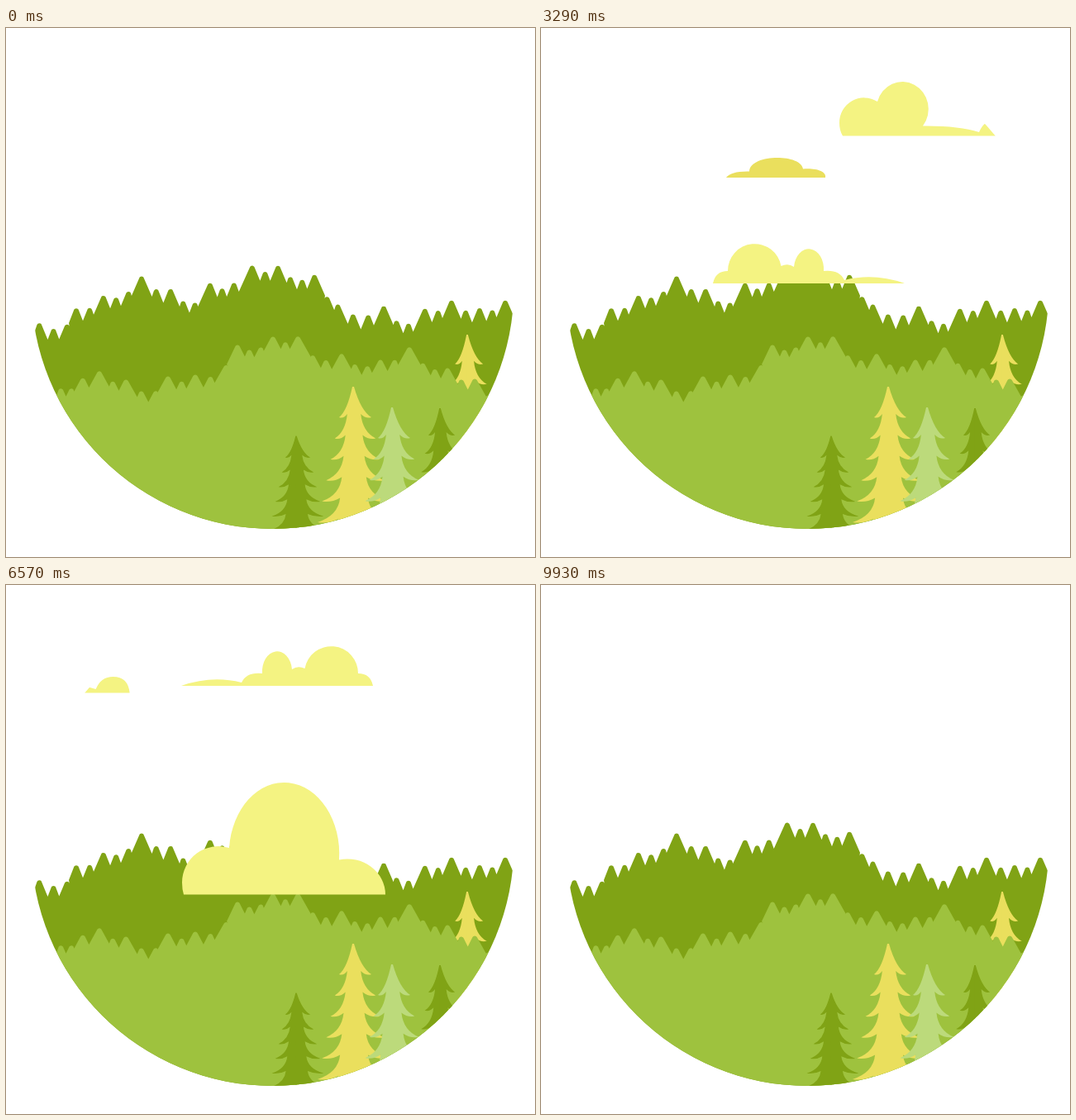
An HTML page with a canvas that plays this animation: 640 by 640 pixels, repeating every 10 s.

```html
<!DOCTYPE html>
<html>
<head>
<meta charset="utf-8">
<style>
  html, body { margin: 0; height: 100%; overflow: hidden; background: #fff; }
  canvas { display: block; }
</style>
</head>
<body>
<canvas id="stage" width="640" height="640"></canvas>
<script>
const ctx = document.getElementById('stage').getContext('2d');
const LOOP = 10000, STEPS = 140, SPEED = 9.16;
const DARK = '#80a315', LIGHT = '#9ec23e', PALE = '#bcda7b', GOLD = '#eadf5d', LEMON = '#f4f382';

// Main peaks of each ridge; smaller ones are filled in between
const backPeaks = [[40, 357], [75, 356], [85, 339], [118, 324], [164, 301], [199, 316], [229, 331],
  [247, 309], [276, 308], [298, 288], [329, 288], [373, 299], [401, 334], [457, 337], [487, 357],
  [507, 340], [539, 330], [573, 339], [604, 330]];
const frontPeaks = [[66, 436], [93, 424], [113, 416], [145, 426], [182, 438], [196, 422], [229, 420],
  [266, 409], [280, 384], [323, 374], [353, 374], [387, 402], [406, 395], [453, 402], [488, 387],
  [534, 412], [567, 425]];

// Splits wide gaps into teeth about 17 px apart that sag below the line between main peaks
function addTeeth(peaks) {
  return peaks.flatMap(([x, y], i) => {
    if (!i) return [[x, y]];
    const [px, py] = peaks[i - 1], gap = x - px, n = Math.max(1, Math.round(gap / 17));
    return Array.from({ length: n }, (_, k) => {
      const f = (k + 1) / n;
      return [px + gap * f, py + (y - py) * f + (f < 1 ? gap * .2 : 0)];
    });
  });
}

// The valley lies where two flanks of equal slope meet
function valley([x1, y1], [x2, y2], slope) {
  const y = (y1 + y2 + slope * (x2 - x1)) / 2;
  const x = x1 + (y - y1) / slope;
  return [Math.min(x2 - 1, Math.max(x1 + 1, x)), y];
}

function hill(color, mainPeaks, slope, radius = 3) {
  const peaks = addTeeth(mainPeaks);
  const [endX, endY] = peaks[peaks.length - 1];
  peaks.push([endX + 18, endY + 14]);
  let [vx, vy] = [peaks[0][0] - 8, peaks[0][1] + 18];
  ctx.fillStyle = color;
  ctx.beginPath();
  ctx.moveTo(20, 640);
  ctx.lineTo(vx, vy);
  for (let i = 0; i < peaks.length - 1; i++) {
    const [px, py] = peaks[i], [nx, ny] = valley(peaks[i], peaks[i + 1], slope);
    const w = (nx - vx) / 2, h = (vy + ny) / 2 - py;
    const lift = 1.5 + Math.min(6, radius * (Math.hypot(w, h) / w - 1));
    ctx.arcTo(px, py - lift, nx, ny, radius);
    ctx.lineTo(nx, ny);
    [vx, vy] = [nx, ny];
  }
  ctx.lineTo(640, vy - 20);
  ctx.lineTo(640, 640);
  ctx.fill();
}

function tree(color, x, y, sx = 1, sy = 1) {
  ctx.save();
  ctx.translate(x, y);
  ctx.scale(sx, sy);
  ctx.fillStyle = color;
  for (const side of [-1, 1]) {
    ctx.beginPath();
    ctx.moveTo(-side, 1);
    ctx.lineTo(side, 1);
    for (let tier = 0; tier < 6; tier++) {
      const tx = side * (19.5 + 5.2 * tier) + 2.5, ty = 38 + 25.4 * tier;
      ctx.quadraticCurveTo(tx * .42, ty - 8, tx, ty);
      ctx.quadraticCurveTo(tx * .7, ty + 2, tx * .42, ty - 4);
    }
    ctx.lineTo(side * 22, 200);
    ctx.lineTo(-side, 200);
    ctx.fill();
  }
  ctx.restore();
}

const puffy = 'M208 309Q211 294 226 294A32.5 32.5 0 0 1 290.5 288Q299 284 306 289' +
  'A18 24 0 0 1 342 294Q361 292 367 305Q403 296 440 309Z';
// Each cloud is drawn where it stands at the given step
const clouds = [
  { at: 46, d: puffy },
  { at: 21, color: GOLD, d: 'M453 181Q459 173 481 173.5C482 152 544 152 546 170.5C560 169 575 173 573 181Z' },
  { at: 46, d: 'M365 130.5Q361 124 361 115A30 30 0 0 1 407 89A31.5 33 0 1 1 462 118.5Q505 118 530 126' +
      'Q536 111 551 111Q569 111 571 130.5Z' },
  { at: 92, d: puffy, mirror: true },
  { at: 92, d: 'M215 374.5Q213 368 213 360A44 44 0 0 1 270 318A66.5 86 0 0 1 403 332.5' +
      'A46 43 0 0 1 459 374.5Z' }
].map(c => ({ ...c, path: new Path2D(c.d) }));

function drawCloud({ at, path, color = LEMON, mirror }, step) {
  ctx.save();
  ctx.translate((at - step) * SPEED, 0);
  if (mirror) {
    ctx.translate(652, -187);
    ctx.scale(-1, 1);
  }
  ctx.fillStyle = color;
  ctx.fill(path);
  ctx.restore();
}

function draw() {
  const time = performance.now() % LOOP;
  const step = Math.floor((time + 5) / (LOOP / STEPS)) % STEPS;
  ctx.fillStyle = '#fff';
  ctx.fillRect(0, 0, 640, 640);
  ctx.save();
  ctx.beginPath();
  ctx.arc(322.5, 314, 292, 0, Math.PI * 2);
  ctx.clip();
  hill(DARK, backPeaks, 1.9);
  tree(GOLD, 558, 370, .87, .96);
  hill(LIGHT, frontPeaks, 1.5);
  tree(DARK, 351, 493, .78, .7);
  tree(GOLD, 420, 433);
  tree(PALE, 467, 458);
  tree(DARK, 525, 459, .83, .88);
  clouds.forEach(c => drawCloud(c, step));
  ctx.restore();
  requestAnimationFrame(draw);
}
draw();
</script>
</body>
</html>
```
